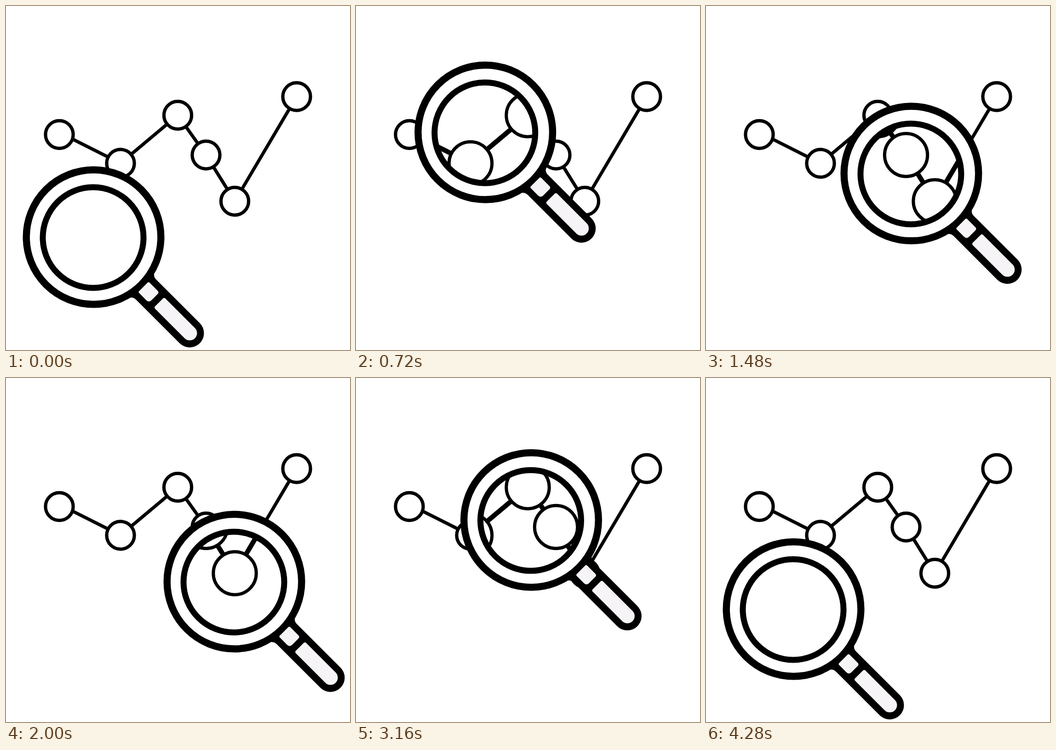
An HTML page that plays this animation: 748x748 px, repeating every 4800 ms.

```html
<!DOCTYPE html>
<html lang="en">
<head>
<meta charset="utf-8">
<title>Magnified line chart</title>
<style>
  html, body { margin: 0; width: 100%; height: 100%; overflow: hidden; background: #fff; }
  svg { display: block; width: 100%; height: 100%; }
</style>
</head>
<body>
<svg viewBox="0 0 748 748" fill="#fff" stroke="#000">
  <defs>
    <clipPath id="lensClip"><circle id="lensHole" r="107"/></clipPath>
    <path id="outward" d="M190.5 502.5 C238 374 275 246 316 246 S442 343 502.5 453.5"/>
    <path id="homeward" d="M502.5 453.5 C397 226 247 262 190.5 502.5"/>
  </defs>
  <g id="chart"></g>
  <g id="glass">
    <circle r="146.3" stroke-width="15.4"/>
    <g transform="rotate(45)" stroke="none">
      <path fill="#000" d="M142 -36 H150 Q154 -31 161 -31 H295.5 A31 31 0 0 1 295.5 31 H161 Q154 31 150 36 H142 Z"/>
      <path fill="#f6f4f7" d="M156 -16 H181 Q186 -16 186 -11 V8 Q186 16 178 16 H156 Q153 16 153 13 V-13 Q153 -16 156 -16 Z"/>
      <path fill="#f6f4f7" d="M205 -16 H295.5 A15.8 15.8 0 0 1 295.5 15.6 H205 Q201 15.6 201 12 V-12 Q201 -16 205 -16 Z"/>
    </g>
  </g>
  <g clip-path="url(#lensClip)"><g id="magnified"></g></g>
  <circle id="innerRing" r="109.5" fill="none" stroke-width="13"/>
</svg>
<script>
const LOOP = 4800, STEP = 40, TURN = 2240, END = 4280;

const nodes = [[116, 279.5], [249, 342], [373.5, 237.5], [435, 324], [497.5, 424.5], [632, 197]];
const lineStart = [116, 275];

const byId = id => document.getElementById(id);

// Sets off at full speed and settles gently
const easeOut = p => (4 * p - p ** 4) / 3;
// Starts from rest and still drifts a little on arrival
const easeIn = p => p * p * (2.62 - 1.62 * p);

function drawChart(group, radius, ringWidth, lineWidth) {
  const points = [lineStart, ...nodes.slice(1)].join(" ");
  const line = `<polyline points="${points}" fill="none" stroke-width="${lineWidth}"/>`;
  const rings = nodes.map(([x, y]) =>
    `<circle cx="${x}" cy="${y}" r="${radius}" stroke-width="${ringWidth}"/>`);
  group.innerHTML = line + rings.join("");
}

function along(path, progress) {
  return path.getPointAtLength(path.getTotalLength() * progress);
}

function lensCentre(t) {
  return t < TURN
    ? along(byId("outward"), easeOut(t / TURN))
    : along(byId("homeward"), easeIn((t - TURN) / (END - TURN)));
}

function place(id, x, y) {
  byId(id).setAttribute("transform", `translate(${x.toFixed(2)} ${y.toFixed(2)})`);
}

function render(ms) {
  const t = Math.min(END, Math.floor((ms % LOOP) / STEP) * STEP);
  const { x, y } = lensCentre(t);
  place("glass", x, y);
  place("lensHole", x - 1, y + 1);
  place("innerRing", x - 1, y + 1);
}

drawChart(byId("chart"), 30.1, 7.2, 7.2);
drawChart(byId("magnified"), 46.7, 7, 10.5);

const start = performance.now();
function tick() {
  render(performance.now() - start);
  requestAnimationFrame(tick);
}
tick();
</script>
</body>
</html>
```
